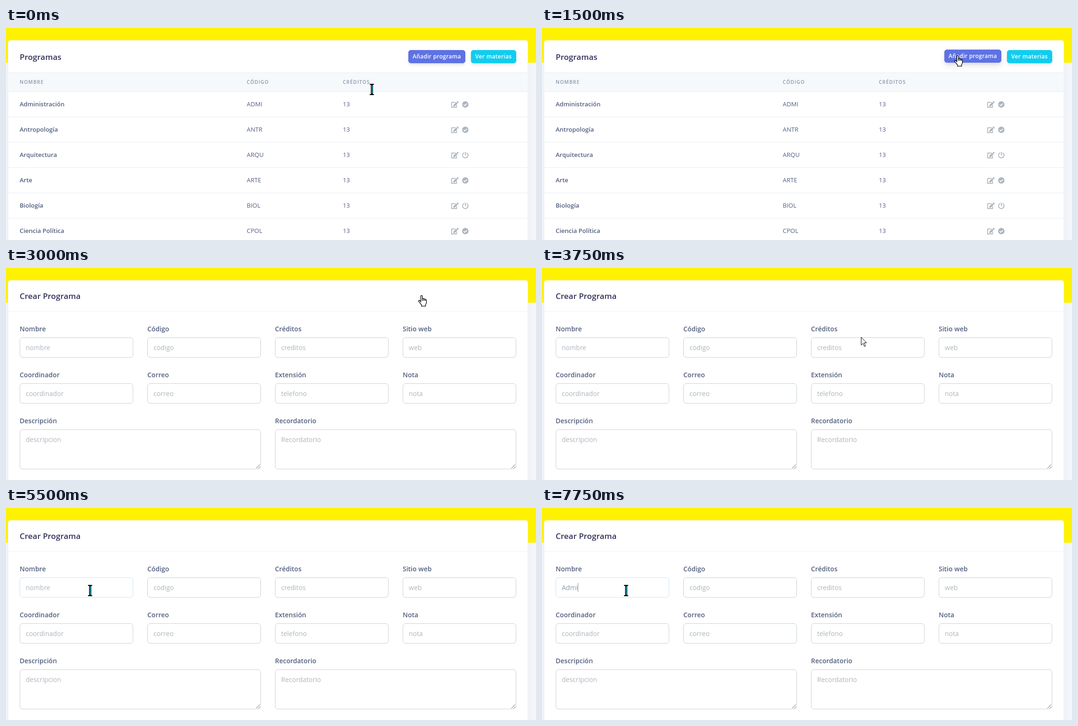
Write an HTML page with a canvas that moves like this. It is 1125x452 px and loops after 8000 ms.

```html
<!DOCTYPE html>
<html lang="es">
<head>
<meta charset="utf-8">
<title>Programas</title>
<style>
html, body { margin: 0; width: 100%; height: 100%; overflow: hidden; background: #f8f9fe; }
canvas { display: block; }
</style>
</head>
<body>
<canvas id="stage" width="1125" height="452"></canvas>
<script>
const ctx = document.getElementById('stage').getContext('2d');
const LOOP = 8000;
const FONT = '"Open Sans", sans-serif';
const COLOR = {
  page: '#f8f9fe', banner: '#fff200', title: '#32325d', text: '#525f7f', muted: '#8898aa',
  hint: '#adb5bd', line: '#e9ecef', field: '#cad1d7', focus: '#cce5f4'
};

const ROWS = [
  ['Administración', 'ADMI', true],
  ['Antropología', 'ANTR', true],
  ['Arquitectura', 'ARQU', false],
  ['Arte', 'ARTE', true],
  ['Biología', 'BIOL', false],
  ['Ciencia Política', 'CPOL', true]
];

// label, placeholder, column, row, height
const FIELDS = [
  ['Nombre', 'nombre', 0, 0], ['Código', 'codigo', 1, 0],
  ['Créditos', 'creditos', 2, 0], ['Sitio web', 'web', 3, 0],
  ['Coordinador', 'coordinador', 0, 1], ['Correo', 'correo', 1, 1],
  ['Extensión', 'telefono', 2, 1], ['Nota', 'nota', 3, 1],
  ['Descripción', 'descripcion', 0, 2], ['Recordatorio', 'Recordatorio', 2, 2]
];

// start time, cursor shape, left, top
const POINTER = [
  [0, 'beam', 772, 119], [250, 'arrow', 773, 120], [750, 'arrow', 796, 112],
  [1000, 'arrow', 859, 82], [1250, 'hand', 875, 58], [3750, 'arrow', 677, 147],
  [4000, 'arrow', 322, 155], [4250, 'arrow', 187, 155], [4750, 'beam', 174, 164]
];

const SHAPE = {
  arrow: new Path2D('M.5 .7V17.3L4.4 13.6 7.4 20.4 9.8 19.4 6.9 12.6H12Z'),
  hand: new Path2D('M5.5 14V2.2Q5.5 .6 7.2 .6 8.9 .6 8.9 2.2V7.6Q9.2 6.8 10.4 6.9 11.8 7 12 8.4 ' +
    '12.6 7.7 13.6 7.9 14.8 8.1 14.9 9.4 17.3 8.8 17.4 11V15.5Q17.4 17.5 15.5 20.5V23.4H7V20.5' +
    'L2.6 15.3Q.2 12.3 1.2 11.4 2.6 10.4 4.2 12.2Z'),
  knuckles: new Path2D('M8.9 7.5V12M12 8.4V12M14.9 9.4V12'),
  edit: new Path2D('M396 78L498 180 274 406 160 418 170 302Z' +
    'M416 54L460 12Q488 -9 516 12L565 60Q586 88 565 116L522 158Z' +
    'M384 340V448H64V128H299L363 64H48Q0 64 0 112V464Q0 512 48 512H400Q448 512 448 464V277Z'),
  tick: new Path2D('M128 264L216 352 384 184')
};

function text(str, x, y, size, weight, color, spacing = 0) {
  ctx.font = `${weight} ${size}px ${FONT}`;
  ctx.letterSpacing = spacing + 'px';
  ctx.fillStyle = color;
  ctx.fillText(str, x, y);
}

function box(x, y, w, h, color) {
  ctx.fillStyle = color;
  ctx.fillRect(x, y, w, h);
}

function roundBox(x, y, w, h, r, fill, stroke) {
  ctx.beginPath();
  ctx.roundRect(x, y, w, h, r);
  if (fill) { ctx.fillStyle = fill; ctx.fill(); }
  if (stroke) { ctx.strokeStyle = stroke; ctx.lineWidth = 1; ctx.stroke(); }
}

function shadowed(dy, blur, color, draw) {
  ctx.save();
  ctx.shadowOffsetY = dy;
  ctx.shadowBlur = blur;
  ctx.shadowColor = color;
  draw();
  ctx.restore();
}

function at(x, y, scale, draw) {
  ctx.save();
  ctx.translate(x, y);
  ctx.scale(scale, scale);
  draw();
  ctx.restore();
}

function card() {
  const body = () => roundBox(4, 26, 1104, 500, 6, '#fff');
  box(0, 0, 1125, 452, COLOR.page);
  shadowed(0, 32, 'rgba(136,152,170,.15)', body);
  box(0, 0, 1125, 74, COLOR.banner);
  body();
  roundBox(4.5, 26.5, 1103, 500, 6, null, 'rgba(0,0,0,.05)');
}

function button(label, x, w, color, hover) {
  const y = hover ? 46 : 47;
  const body = () => roundBox(x, y, w, 28, 6, color);
  if (hover) {
    shadowed(7, 14, 'rgba(50,50,93,.1)', body);
    shadowed(3, 6, 'rgba(0,0,0,.08)', body);
  } else {
    shadowed(4, 6, 'rgba(50,50,93,.11)', body);
    shadowed(1, 3, 'rgba(0,0,0,.08)', body);
  }
  text(label, x + 9, y + 18, 12, 600, '#fff', 0.3);
}

function statusIcon(active) {
  ctx.beginPath();
  ctx.lineWidth = 64;
  if (active) {
    ctx.arc(256, 256, 248, 0, Math.PI * 2);
    ctx.fill();
    ctx.strokeStyle = '#fff';
    ctx.stroke(SHAPE.tick);
  } else {
    ctx.lineCap = 'round';
    ctx.strokeStyle = COLOR.hint;
    ctx.arc(256, 264, 212, -Math.PI * 0.3, Math.PI * 1.3);
    ctx.moveTo(256, 32);
    ctx.lineTo(256, 256);
    ctx.stroke();
  }
}

function listView(hover) {
  text('Programas', 29, 68, 17, 600, COLOR.title);
  button('Añadir programa', 854, 121, '#5e72e4', hover);
  button('Ver materias', 987, 96, '#11cdef', false);

  box(5, 95, 1102, 41, COLOR.line);
  box(5, 96, 1102, 39, '#f6f9fc');
  text('NOMBRE', 29, 119, 10.4, 600, COLOR.muted, 1);
  text('CÓDIGO', 511, 119, 10.4, 600, COLOR.muted, 1);
  text('CRÉDITOS', 715, 119, 10.4, 600, COLOR.muted, 1);

  ROWS.forEach(([name, code, active], i) => {
    const y = 135 + i * 54;
    box(5, y, 1102, 1, COLOR.line);
    text(name, 29, y + 32, 13, 600, COLOR.text);
    text(code, 511, y + 32, 13, 400, COLOR.text);
    text('13', 715, y + 32, 13, 400, COLOR.text);
    ctx.fillStyle = COLOR.hint;
    at(945, y + 21, 14 / 512, () => ctx.fill(SHAPE.edit));
    at(968, y + 21, 14 / 512, () => statusIcon(active));
  });
}

function resizeGrip(x, y) {
  ctx.beginPath();
  ctx.moveTo(x - 10, y - 2);
  ctx.lineTo(x - 2, y - 10);
  ctx.moveTo(x - 5, y - 2);
  ctx.lineTo(x - 2, y - 5);
  ctx.strokeStyle = '#666';
  ctx.lineWidth = 1;
  ctx.stroke();
}

function formView(focused, typed, caret) {
  text('Crear Programa', 29, 66, 17, 600, COLOR.title);
  box(5, 92, 1102, 1, '#f2f2f2');

  FIELDS.forEach(([label, hint, col, row], i) => {
    const x = 29 + col * 271, y = 148 + row * 98;
    const area = row === 2;
    const w = area ? 512 : 241, h = area ? 85 : 43;
    const active = focused && i === 0;
    text(label, x, y - 13, 14, 600, COLOR.text);
    roundBox(x + 0.5, y + 0.5, w - 1, h - 1, 5.5, '#fff', active ? COLOR.focus : COLOR.field);
    if (area) resizeGrip(x + w, y + h);
    const value = active ? typed : '';
    text(value || hint, x + 13, y + 27, 14, 400, value ? COLOR.muted : COLOR.hint);
    if (active && caret) {
      box(Math.round(x + 13 + ctx.measureText(value).width), y + 12, 1, 19, COLOR.muted);
    }
  });
}

function drawBeam() {
  box(0, 0, 9, 2, '#000');
  box(0, 22, 9, 2, '#000');
  box(2.5, 1, 4.5, 22, '#000');
  box(4, 3, 2, 18, '#16a3bd');
}

function pointer(t) {
  const [, kind, x, y] = POINTER.findLast(p => p[0] <= t);
  at(x, y, 1, () => {
    if (kind === 'beam') return drawBeam();
    ctx.fillStyle = '#fff';
    ctx.strokeStyle = '#000';
    ctx.lineWidth = kind === 'hand' ? 1.3 : 1;
    ctx.fill(SHAPE[kind]);
    ctx.stroke(SHAPE[kind]);
    if (kind === 'hand') ctx.stroke(SHAPE.knuckles);
  });
}

function render(now) {
  const t = now % LOOP;
  card();
  if (t < 3000) {
    listView(t >= 1250);
  } else {
    const typed = t >= 7750 ? 'Admi' : t >= 7500 ? 'A' : '';
    const caret = typed !== '' || Math.floor((t - 5000) / 500) % 2 === 0;
    formView(t >= 5000, typed, caret);
  }
  pointer(t);
}

const start = performance.now();
function tick() {
  render(performance.now() - start);
  requestAnimationFrame(tick);
}
tick();
</script>
</body>
</html>
```
